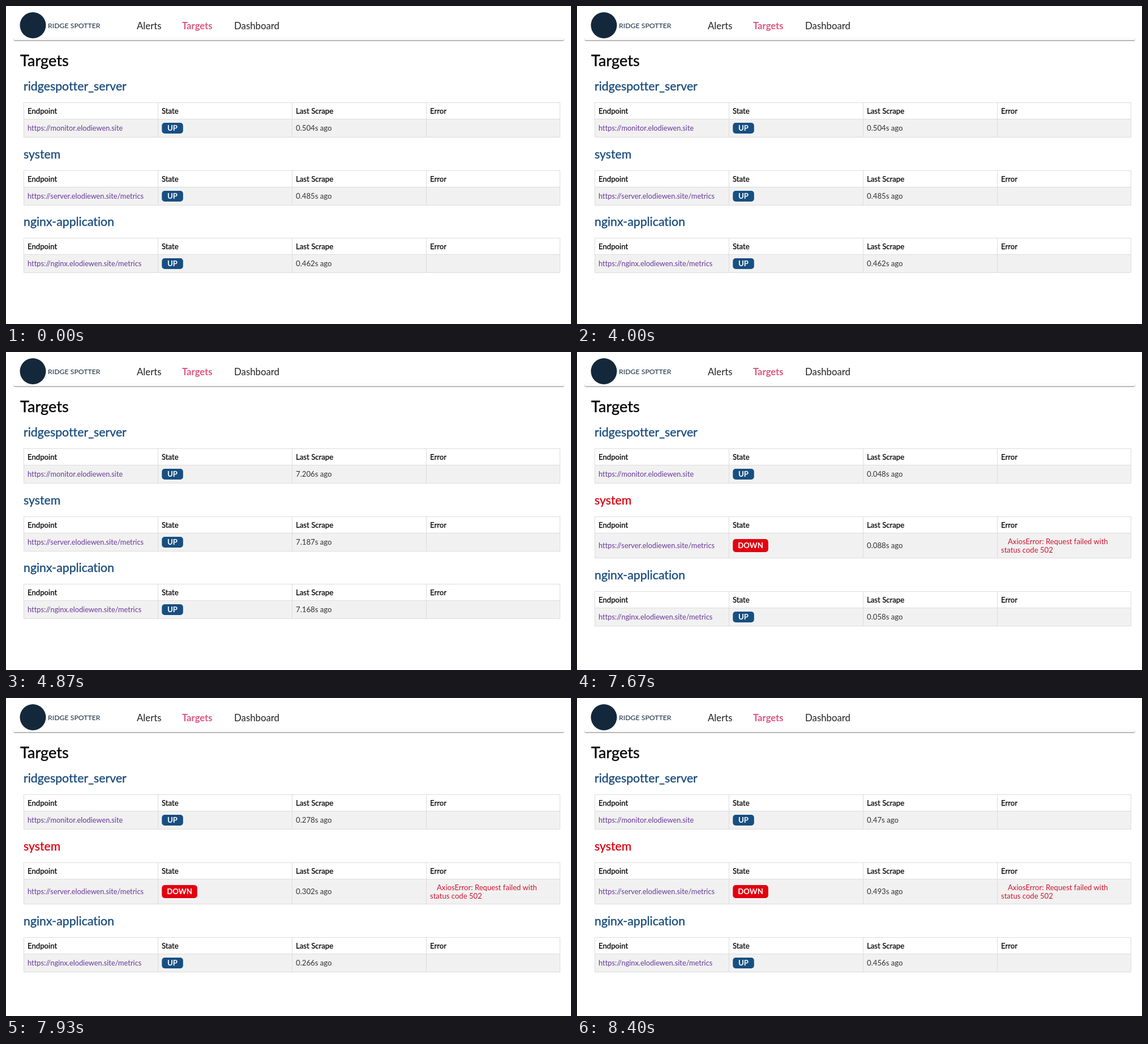
These frames come from a looping animation (998 by 561 pixels, 9540 ms). An HTML page:

```html
<!DOCTYPE html>
<html lang="en">
<head>
<meta charset="utf-8">
<title>Targets</title>
<style>
html, body { margin: 0; width: 100%; height: 100%; overflow: hidden; background: #fff; }
svg { display: block; width: 998px; height: 561px; }
text { font: 13.2px Lato, "Open Sans", sans-serif; font-variant-ligatures: none; fill: #333; white-space: pre; }
.edge { fill: #fff; filter: drop-shadow(0 1.5px 1.2px #0008); }
.brand { font-size: 12.3px; fill: #14283c; }
.nav { font-size: 16.8px; fill: #222; }
.on { fill: #de5580; font-weight: 700; font-size: 16.6px; }
.h1 { font-size: 27.2px; fill: #000; stroke: #000; stroke-width: .35px; }
.h2 { font-size: 21.3px; fill: #174a7c; stroke: #174a7c; stroke-width: .35px; }
.h2.bad { fill: #d8000f; stroke: #d8000f; }
.th { font-size: 13.2px; fill: #000; stroke: #000; stroke-width: .25px; }
.link { font-size: 12.8px; fill: #68399a; }
.err { font-size: 13.1px; fill: #d0152f; }
.badge { font-weight: 700; fill: #fff; text-anchor: middle; }
.grid { fill: none; stroke: #ddd; }
</style>
</head>
<body>
<svg id="stage" viewBox="0 0 998 561"></svg>
<script>
const LOOP = 9540;
const columns = [31.5, 268.5, 505.5, 742.5];
const heads = ["Endpoint", "State", "Last Scrape", "Error"];
const targets = [
  ["ridgespotter_server", "https://monitor.elodiewen.site"],
  ["system", "https://server.elodiewen.site/metrics"],
  ["nginx-application", "https://nginx.elodiewen.site/metrics"]
];
// Start time, seconds since each scrape, whether the system target is down
const states = [
  [0, [0.504, 0.485, 0.462], false],
  [4670, [7.206, 7.187, 7.168], false],
  [7670, [0.048, 0.088, 0.058], true],
  [7930, [0.278, 0.302, 0.266], true],
  [8130, [0.47, 0.493, 0.456], true]
];

const text = (x, y, cls, s) => `<text x="${x}" y="${y}" class="${cls}">${s}</text>`;
const rect = (x, y, w, h, fill, r = 0) =>
  `<rect x="${x}" y="${y}" width="${w}" height="${h}" rx="${r}" fill="${fill}"/>`;

const header = `<rect class="edge" x="14" y="57" width="971" height="3"/>
  <circle cx="47.5" cy="34" r="23" fill="#14283c"/>` +
  text(74, 39, "brand", "RIDGE SPOTTER") +
  text(231, 41, "nav", "Alerts") +
  text(311, 41, "nav on", "Targets") +
  text(403, 41, "nav", "Dashboard") +
  text(25, 106, "h1", "Targets");

function table(top, [name, url], age, down) {
  const body = top + 29, height = down ? 44 : 32;
  const bottom = body + height, mid = body + height / 2;
  const base = mid + 4.8;
  const [w, h] = down ? [62.5, 23] : [37.5, 19];
  const lines = columns.slice(1).map(x => `M${x} ${top}V${bottom}`).join("");
  return text(31, top - 21.5, down ? "h2 bad" : "h2", name) +
    rect(31.5, body, 947, height, "#f1f1f1") +
    `<path class="grid" d="M31.5 ${top}H978.5V${bottom}H31.5ZM31.5 ${body}H978.5${lines}"/>` +
    heads.map((s, i) => text(columns[i] + 6.5, top + 19.2, "th", s)).join("") +
    text(38, base, "link", url) +
    rect(275.3, mid - h / 2, w, h, down ? "#e3000f" : "#174f82", 5) +
    text(275.3 + w / 2, base, "badge", down ? "DOWN" : "UP") +
    text(512, base, "", age + "s ago") +
    (down ? text(761, mid - 3, "err", "AxiosError: Request failed with") +
      text(749, mid + 12.5, "err", "status code 502") : "");
}

function draw([, ages, down]) {
  const tops = [170.5, 290.5, down ? 422.5 : 409.5];
  stage.innerHTML = header +
    targets.map((t, i) => table(tops[i], t, ages[i], down && i === 1)).join("");
}

const stage = document.getElementById("stage");
const start = performance.now();
let shown;
function frame() {
  const time = (performance.now() - start) % LOOP;
  const state = states.findLast(s => s[0] <= time);
  if (state !== shown) draw(shown = state);
  requestAnimationFrame(frame);
}
frame();
</script>
</body>
</html>
```
